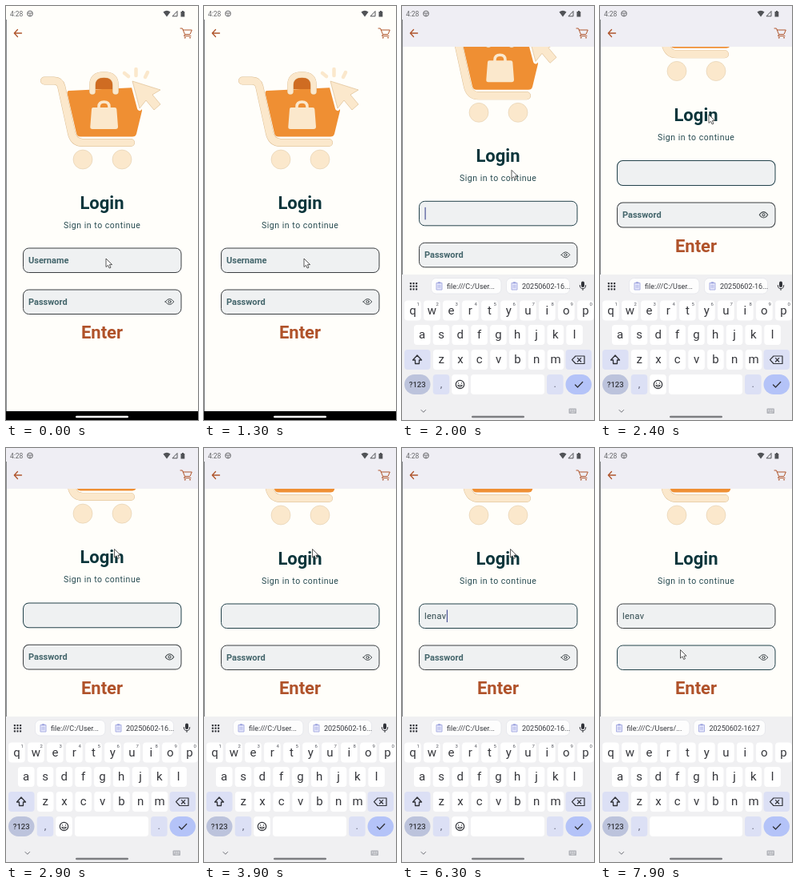
Recreate the animation shown at these times as an HTML page. Size 240 by 518 pixels, loop 8 s.

```html
<!DOCTYPE html>
<html lang="en">
<head>
<meta charset="utf-8">
<title>Login screen</title>
<style>
html, body { margin: 0; width: 100%; height: 100%; overflow: hidden; background: #fffefa; }
svg { display: block; width: 240px; height: 518px; font-family: Roboto, sans-serif; }
.line { fill: none; stroke-linecap: round; stroke-linejoin: round; }
.bold { font-weight: 700; }
.mid { text-anchor: middle; }
.key { font-size: 15px; fill: #36373c; text-anchor: middle; }
.mark { font-size: 13px; fill: #63667a; text-anchor: middle; }
.hint { font-size: 6px; fill: #55575f; text-anchor: middle; }
.chip { font-size: 9px; fill: #35373d; }
.field { fill: #eff1f2; stroke: #3b3f42; }
.field.on { stroke: #23424b; }
</style>
</head>
<body>
<svg viewBox="0 0 240 518">
  <defs>
    <clipPath id="view"><rect y="51" width="240" height="456"/></clipPath>
    <g id="eye" class="line" stroke="#41484b">
      <path d="M-5.300 0Q0-7.200 5.300 0Q0 7.200-5.300 0Z"/><circle r="1.600"/>
    </g>
    <g id="clip">
      <path d="M-3.500-4h7v8.500h-7z" fill="#e3e5fa" stroke="#a3a9e0" stroke-width=".9"/>
      <path d="M-1.600-5.200h3.200v2h-3.200zM-2-1h4v.8h-4zM-2 1h4v.8h-4z" fill="#9aa1dd"/>
    </g>
  </defs>
  <rect width="240" height="518" fill="#fffefa"/>

  <g clip-path="url(#view)">
    <g id="page">
      <path d="M79 106L162 102Q168 103 168.500 109L170 131L163 160Q162 163.500 158 163.500H93Q89 163.500 88 159.500L76.700 110Q76 106 79 106Z" fill="#ef8f33"/>
      <path d="M110 104V97Q112 87 123 87Q134 87 136 97V104Z" fill="#cf6c22"/>
      <g class="line">
        <path d="M108 107V99Q108 86 122.500 86Q137 86 137 99V107" stroke="#d9b98c" stroke-width="7.600"/>
        <path d="M108 107V99Q108 86 122.500 86Q137 86 137 99V107" stroke="#fbe8cc" stroke-width="7"/>
        <path d="M116 130V126Q116 120 122.500 120Q129 120 129 126V130" stroke="#fbe8cc" stroke-width="3.500"/>
        <path d="M48 93.500H60Q67.500 93.500 69.300 101L81.500 157Q84 171 96 171H156" stroke="#d9b98c" stroke-width="10"/>
        <path d="M48 93.500H60Q67.500 93.500 69.300 101L81.500 157Q84 171 96 171H156" stroke="#fbe8cc" stroke-width="9.200"/>
      </g>
      <path d="M109 127H136Q138 127 138.300 129L140 151Q140 154 137 154H108Q105 154 105.300 151L107 129Q107 127 109 127Z" fill="#fbe8cc"/>
      <g fill="#fbe8cc" stroke="#dcc7a4" stroke-width=".5">
        <circle cx="96" cy="192" r="12"/><circle cx="145" cy="192" r="12"/>
      </g>
      <path d="M158 94L193 105L183 111L193 123L185 130L175 118L167 128Z" fill="#fffefa" stroke="#fffefa" stroke-width="6" stroke-linejoin="round"/>
      <path d="M158 94L193 105L183 111L193 123L185 130L175 118L167 128Z" fill="#fbe8cc" stroke="#dfbf93" stroke-width=".7" stroke-linejoin="round"/>
      <path d="M148 84L153 88M162.500 79V87M177 83L174 89" class="line" stroke="#fbe8cc" stroke-width="4.500"/>

      <text x="120" y="253.500" class="bold mid" font-size="22" fill="#0b353b">Login</text>
      <text x="72" y="277.500" font-size="10.500" letter-spacing=".53" fill="#264a50">Sign in to continue</text>
      <rect id="userBox" class="field" x="21.500" y="303" width="197.500" height="30.500" rx="7"/>
      <text id="userLabel" x="28" y="322" class="bold" font-size="11" fill="#43656b">Username</text>
      <text id="typed" x="28" y="322" font-size="11" letter-spacing=".3" fill="#2d474c"></text>
      <rect id="caret" x="28.500" y="310.500" width="1.200" height="15.500" fill="#4c5597"/>
      <rect id="passBox" class="field" x="21.500" y="355" width="197.500" height="30.500" rx="7"/>
      <text id="passLabel" x="28" y="374" class="bold" font-size="11" fill="#43656b">Password</text>
      <use href="#eye" x="204.500" y="370"/>
      <text x="120" y="416" class="bold mid" font-size="22" fill="#b0522a">Enter</text>
    </g>
  </g>

  <rect id="bar" width="240" height="51" fill="#efeef4"/>
  <text x="5" y="12.800" font-size="8.500" fill="#66676a">4:28</text>
  <g stroke="#66676a" fill="none"><circle cx="30" cy="9.500" r="3.400"/><path d="M27 9h6M30 10v3"/></g>
  <path d="M196.500 7.500Q201 4 205.500 7.500L201 13.500Z" fill="#505256"/>
  <path d="M208 12.800H214V6.500Z" fill="none" stroke="#505256"/>
  <path d="M218.500 7H220V6H222V7H223.300V13.500H218.500Z" fill="#505256"/>
  <g class="line" stroke="#b0562d">
    <path d="M10.500 34H19.500M14.500 29.500L10.300 34L14.500 38.500" stroke-width="1.300"/>
    <path d="M218 28H220.500L223.500 35.500H230L232.300 30H221.300M223.500 35.500L222.500 37.500H231"/>
    <circle cx="223.700" cy="39.700" r=".5"/><circle cx="230" cy="39.700" r=".5"/>
  </g>
  <path d="M.5 17V507" stroke="#85878a"/>
  <rect y="507" width="240" height="11"/>
  <rect x="87" y="512.700" width="66" height="2.600" rx="1.300" fill="#fff"/>

  <g id="board">
    <rect y="336" width="240" height="182" fill="#f0f0f2"/>
    <g id="keys"></g>
    <g id="plain"></g>
    <g id="secret"></g>
    <path d="M24 505.500L26.800 508.300L29.600 505.500" class="line" stroke="#6d6f76"/>
    <rect x="208.500" y="503.500" width="9.500" height="6.500" rx="1" fill="#b2b4ba"/>
    <path d="M210 505.500h7M210 507h7M211.500 508.700h4" stroke="#f0f0f2" stroke-width=".8" stroke-dasharray="1 .6"/>
    <rect x="87" y="512.700" width="66" height="2.600" rx="1.300" fill="#7c7d81"/>
  </g>
  <path id="mouse" d="M0 0V10.500L2.500 8.300L4.200 12L6 11.200L4.400 7.600H7.600Z" fill="#fff" stroke="#333" stroke-width=".8" stroke-linejoin="round"/>
</svg>

<script>
const $ = id => document.getElementById(id);
const LOOP = 8000, NAME = "lenav";
const TOUCH = 1450, SWITCH = 7600, MAX_SCROLL = 108, GRAB_Y = 264;
const TYPE_TIMES = [4500, 4800, 5150, 5500, 5900];
// time, x, y of the pointer
const PATH = [[0, 125, 316], [1450, 125, 316], [1750, 137, 264], [2000, 137, 205.5],
  [2400, 136, 136], [2600, 135.5, 126.5], [6450, 135.5, 126.5], [7450, 100.5, 252.5]];

const box = (x, y, w, h, fill = "#fff", r = 4, more = "") =>
  `<rect x="${x}" y="${y}" width="${w}" height="${h}" rx="${r}" fill="${fill}" ${more}/>`;
const text = (x, y, s, cls, more = "") => `<text x="${x}" y="${y}" class="${cls}" ${more}>${s}</text>`;
const chip = (x, w, s) => box(x, 340.5, w, 19.5, "#fdfdfd", 6, 'stroke="#e4e5ea" stroke-width=".8"') +
  `<use href="#clip" x="${x + 10}" y="350.5"/>` + text(x + 19.5, 353.5, s, "chip");
const icon = (d, w = 1.3) => `<path d="${d}" class="line" stroke="#303238" stroke-width="${w}"/>`;

function row(letters, x0, y, step) {
  return [...letters].map((c, i) => {
    const x = x0 + i * step;
    return box(x - 10.3, y, 20.6, 25) + text(x, y + 17, c, "key");
  }).join("");
}

function buildBoard() {
  const soft = "#dce0f5";
  $("keys").innerHTML =
    row("qwertyuiop", 13.4, 368.5, 24) + row("asdfghjkl", 25.2, 399, 23.8) + row("zxcvbnm", 49.2, 430, 23.8) +
    box(3, 430, 32.5, 25, soft) + box(204.5, 430, 32.5, 25, soft) +
    icon("M19 437L13.5 443H16.5V447.5H21.5V443H24.5Z") +
    icon("M217 438H228V447.5H217L212.5 442.7ZM219.5 440.7L223.7 445M223.7 440.7L219.5 445", 1.2) +
    box(3, 461, 32.5, 25, "#bcc3dc", 12.5) + text(19.2, 477, "?123", "mid", 'font-size="9.5" font-weight="500" fill="#35373d"') +
    box(38.7, 461, 20.6, 25, soft) + text(49, 477, ",", "mark") +
    box(181, 461, 20.6, 25, soft) + text(191.3, 477, ".", "mark") +
    box(204.5, 461, 32.5, 25, "#b4c3f8", 12.5) + icon("M216.5 474L219.5 477L225.7 470.5");

  const dots = Array.from({ length: 9 }, (_, i) =>
    box(9.8 + i % 3 * 3.6, 346 + Math.floor(i / 3) * 3.6, 2.2, 2.2, "#303238", .6)).join("");
  const hints = [..."1234567890"].map((c, i) => text(20.3 + i * 24, 375, c, "hint")).join("");
  $("plain").innerHTML = dots + chip(36.5, 87.5, "file:///C:/User...") + chip(130.5, 79, "20250602-16...") + hints +
    box(224, 344.5, 4, 7.5, "#303238", 2) + icon("M222.3 349.5Q222.3 353.7 226 353.7Q229.7 353.7 229.7 349.5M226 354V355.5", 1) +
    box(62.2, 461, 20.6, 25) + box(86, 461, 92, 25) +
    '<circle cx="72.5" cy="473.5" r="5.2" fill="none" stroke="#303238" stroke-width="1.2"/>' +
    icon("M70.6 472V472.1M74.4 472V472.1") + icon("M69.8 475Q72.5 478.5 75.2 475Z", 1);
  $("secret").innerHTML = chip(14, 98, "file:///C:/Users/...") + chip(117, 89.5, "20250602-1627") + box(62.2, 461, 115.8, 25);
}

const clamp = (v, a = 0, b = 1) => Math.min(b, Math.max(a, v));
const show = (id, on) => $(id).setAttribute("visibility", on ? "visible" : "hidden");

function pointer(t) {
  const i = PATH.findIndex(p => p[0] > t);
  if (i < 0) return PATH[PATH.length - 1].slice(1);
  const [t0, x0, y0] = PATH[i - 1], [t1, x1, y1] = PATH[i];
  let k = (t - t0) / (t1 - t0);
  if (t > 6000) k = k * k * (3 - 2 * k);
  return [x0 + (x1 - x0) * k, y0 + (y1 - y0) * k];
}

function caretOn(t, count) {
  if (t < TOUCH + 50 || t >= SWITCH) return false;
  if (count) return (t - TYPE_TIMES[count - 1]) % 1000 < 500;
  return (t + 80) % 1000 < 470;
}

function draw(t) {
  const [mx, my] = pointer(t);
  $("mouse").setAttribute("transform", `translate(${mx} ${my})`);

  // drag scrolls the page, the excess stretches it until release
  const [, dragY] = pointer(Math.min(t, 2600));
  const pull = t > 1750 ? Math.max(0, GRAB_Y - dragY) : 0;
  const scroll = Math.min(pull, MAX_SCROLL);
  const release = (1 - clamp((t - 2800) / 350)) ** 2;
  const stretch = 1 + .0005 * (pull - scroll) * release;
  $("page").setAttribute("transform", `translate(0 336) scale(1 ${stretch}) translate(0 ${-336 - scroll})`);
  show("bar", scroll > 0);

  const rise = (1 - clamp((t - TOUCH - 80) / 250)) ** 3;
  $("board").setAttribute("transform", `translate(0 ${182 * rise})`);
  const inPass = t >= SWITCH, inUser = t >= TOUCH + 50 && !inPass;
  show("plain", !inPass);
  show("secret", inPass);
  $("userBox").classList.toggle("on", inUser);
  $("passBox").classList.toggle("on", inPass);
  show("userLabel", t < TOUCH + 50);
  show("passLabel", !inPass);

  const count = TYPE_TIMES.filter(s => s <= t).length, word = NAME.slice(0, count);
  if ($("typed").textContent !== word) $("typed").textContent = word;
  $("caret").setAttribute("x", 28.5 + (count ? $("typed").getComputedTextLength() : 0));
  show("caret", caretOn(t, count));
}

function tick() {
  draw(performance.now() % LOOP);
  requestAnimationFrame(tick);
}
buildBoard();
tick();
</script>
</body>
</html>
```
